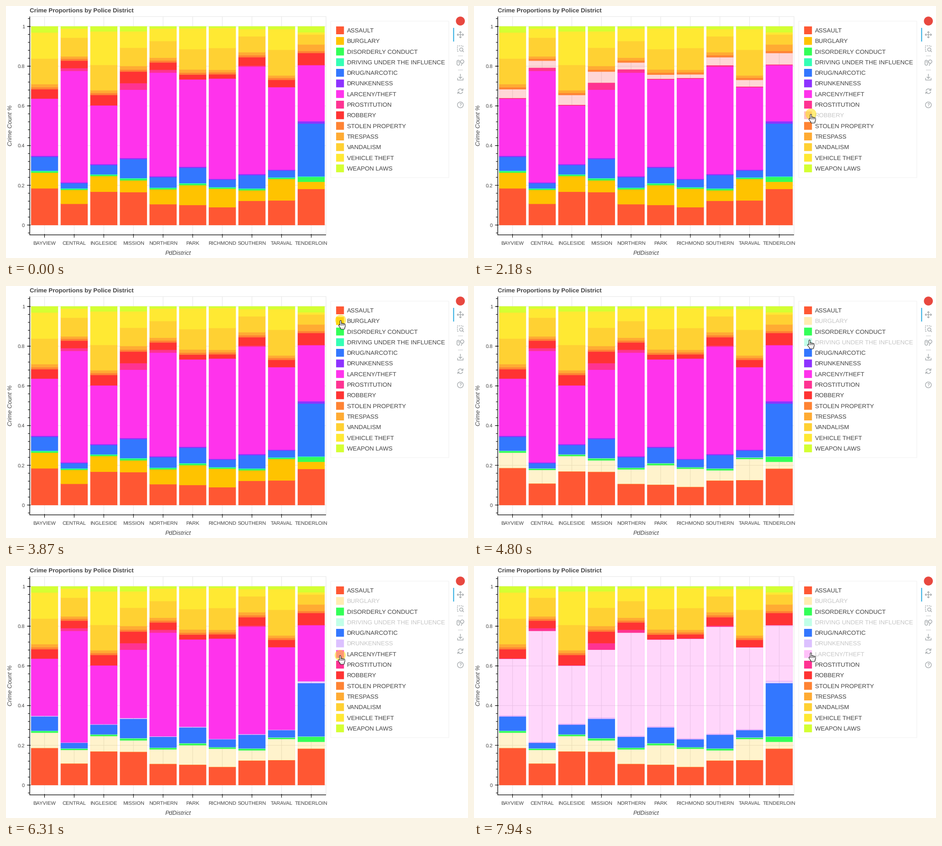
Write a matplotlib script that moves like this. It is 1012 px wide and 553 px high and loops after 8 s.

```python
import numpy as np
import matplotlib.pyplot as plt
from matplotlib.animation import FuncAnimation
from matplotlib.collections import LineCollection, PolyCollection
from matplotlib.patches import Circle, Polygon, Rectangle
from matplotlib.transforms import Affine2D

W, H, DPI = 1012, 553, 64
PX = 72 / DPI                       # points per pixel
LOOP, STEP = 8000, 40
INK, GRID, ICON = "#444444", "#e5e5e5", "#a1a6a9"
BIG, SMALL = 13.2, 11.17            # font sizes in pixels

LEFT, RIGHT, TOP, BOTTOM = 52, 701, 23.2, 502.3
ZERO, UNIT = 480.6, 435.6

# Key levels in thousandths: top of assault and burglary,
# bottom and top of larceny, bottom and top of vandalism
DISTRICTS = {
    "BAYVIEW": (185, 264, 349, 636, 710, 839),
    "CENTRAL": (107, 177, 215, 777, 850, 944),
    "INGLESIDE": (168, 247, 307, 602, 679, 807),
    "MISSION": (166, 225, 338, 682, 801, 893),
    "NORTHERN": (105, 180, 246, 768, 843, 927),
    "PARK": (101, 201, 294, 733, 784, 886),
    "RICHMOND": (90, 183, 233, 737, 782, 892),
    "SOUTHERN": (122, 175, 257, 798, 871, 951),
    "TARAVAL": (124, 232, 279, 694, 754, 883),
    "TENDERLOIN": (182, 218, 523, 805, 910, 960),
}
CRIMES = {
    "ASSAULT": "#ff5733", "BURGLARY": "#ffc300",
    "DISORDERLY CONDUCT": "#33ff57",
    "DRIVING UNDER THE INFLUENCE": "#33ffb5",
    "DRUG/NARCOTIC": "#3377ff", "DRUNKENNESS": "#8d33ff",
    "LARCENY/THEFT": "#ff33ec", "PROSTITUTION": "#ff3392",
    "ROBBERY": "#ff3333", "STOLEN PROPERTY": "#ff8333",
    "TRESPASS": "#ffab33", "VANDALISM": "#ffd133",
    "VEHICLE THEFT": "#ffe933", "WEAPON LAWS": "#d4ff33",
}

# Pointer moves: start, end, number of steps, way points
MOVES = [
    (60, 240, 3, [(1044, 640), (846, 325)]),
    (570, 930, 5, [(846, 325), (739, 237)]),
    (1090, 1360, 4, [(739, 237), (741, 238), (738, 237)]),
    (2770, 3520, 10, [(738, 237), (748, 170), (736, 95), (724, 57), (733, 75)]),
    (4120, 4440, 5, [(733, 75), (731, 97), (735, 118)]),
    (4950, 5370, 6, [(735, 118), (735, 174)]),
    (5790, 6140, 5, [(735, 174), (732, 196)]),
    (7280, 7440, 3, [(732, 196), (736, 215)]),
    (7620, 7940, 5, [(736, 215), (738, 190)]),
]
# Press, release, legend entry toggled on release
CLICKS = [(1450, 1530, 8), (2180, 2260, 8), (3870, 3960, 1),
          (4610, 4800, 3), (5450, 5610, 5), (6310, 6470, 6)]

plt.rcParams.update({"font.family": "Liberation Sans", "text.hinting": "none"})
fig = plt.figure(figsize=(W / DPI, H / DPI), dpi=DPI, facecolor="white")
ax = fig.add_axes([0, 0, 1, 1])
ax.set(xlim=(0, W), ylim=(H, 0))
ax.axis("off")


def lines(segments, color, width=1, z=1, **kw):
    art = LineCollection(segments, colors=color, linewidths=width * PX,
                         zorder=z, snap=False, **kw)
    ax.add_collection(art, autolim=False)
    return art


def label(x, mid, text, size=SMALL, ha="left", color=INK, **kw):
    """Text whose capitals are centred on the height mid."""
    return ax.text(x, mid + .358 * size, text, fontsize=size * PX, ha=ha,
                   va="baseline", color=color, zorder=6, **kw)


def box(x, y, w, h, **kw):
    return ax.add_patch(Rectangle((x, y), w, h, snap=False, **kw))


def arc(x, y, r, start=0, end=360):
    a = np.radians(np.linspace(start, end, 30))
    return np.column_stack([x + r * np.cos(a), y + r * np.sin(a)])


def stack_levels(assault, burglary, larceny, larceny_top, vandal, vandal_top):
    """Borders of all stacked parts; the thin ones follow from the key levels."""
    trespass = 8.7 + .08 * (larceny - burglary)
    disorderly = burglary + 1.8 + .02 * trespass ** 2
    robbery_top = vandal - trespass - 10
    robbery = max(larceny_top + 2, robbery_top - .35 * assault)
    weapon = 1000 - .00087 * assault ** 2
    return [0, assault, burglary, disorderly, disorderly + 3.5,
            larceny - .35 * trespass, larceny, larceny_top, robbery, robbery_top,
            vandal - trespass, vandal, vandal_top, weapon, 1000]


def draw_axes():
    majors = ZERO - UNIT * np.arange(6) / 5
    minors = ZERO - UNIT * np.arange(-1, 27) / 25
    pitch = (RIGHT - LEFT) / len(DISTRICTS)
    centres = LEFT + pitch * (np.arange(len(DISTRICTS)) + .5)

    lines([[(LEFT, y), (RIGHT, y)] for y in majors]
          + [[(x, TOP), (x, BOTTOM)] for x in centres]
          + [[(LEFT, TOP), (RIGHT, TOP), (RIGHT, BOTTOM)]], GRID)
    lines([[(LEFT, TOP), (LEFT, BOTTOM), (RIGHT, BOTTOM)]], "black", 1.3, 4)
    lines([[(LEFT - 6, y), (LEFT + 2, y)] for y in majors]
          + [[(LEFT - 4, y), (LEFT, y)] for y in minors]
          + [[(x, BOTTOM - 2), (x, BOTTOM + 6)] for x in centres], "black", 1.1, 4)

    for i, y in enumerate(majors):
        label(41, y, f"{i / 5:g}", ha="right")
    for x, name in zip(centres, DISTRICTS):
        label(x, 520, name, ha="center")
    label(52, 10, "Crime Proportions by Police District", BIG, weight="bold")
    label(376.7, 541.5, "PdDistrict", BIG, "center", style="italic")
    ax.text(9.8, 262, "Crime Count %", fontsize=BIG * PX, rotation=90,
            ha="center", va="center", color=INK, style="italic")
    return centres, .45 * pitch


def draw_bars(centres, half):
    levels = np.array([stack_levels(*key) for key in DISTRICTS.values()])
    edges = ZERO - UNIT * levels / 1000
    layers = []
    for k, color in enumerate(CRIMES.values()):
        rects = [[(x - half, lo), (x + half, lo), (x + half, hi), (x - half, hi)]
                 for x, lo, hi in zip(centres, edges[:, k], edges[:, k + 1])]
        layer = PolyCollection(rects, facecolors=color, edgecolors=color,
                               linewidths=PX, zorder=2, snap=False)
        ax.add_collection(layer, autolim=False)
        layers.append(layer)
    return layers


def draw_legend():
    box(711.4, 33.3, 258.6, 343.3, fc="white", ec="#f1f1f1", lw=PX, zorder=4)
    items = []
    for k, (name, color) in enumerate(CRIMES.items()):
        mid = 53.4 + 23.3 * k
        swatch = box(723.1, mid - 8.6, 17.2, 17.2, fc=color, lw=0, zorder=5)
        items.append((swatch, label(746.7, mid - .3, name, BIG)))
    return items


def draw_toolbar():
    x = 995.3
    ax.add_patch(Circle((x, 33), 9.8, fc="#e8483f", lw=0))
    lines([[(980.5, 48), (980.5, 78)]], "#26aae1", 2)
    lines([[(990, y), (1001, y)] for y in (109.5, 140.5)], "#c8cacc")

    strokes = [[(x - 6, 63), (x + 6, 63)], [(x, 57), (x, 69)]]
    for ux, uy in ((1, 0), (-1, 0), (0, 1), (0, -1)):       # pan
        tip = np.array([x + 7 * ux, 63 + 7 * uy])
        back, side = 2.5 * np.array([ux, uy]), 2.5 * np.array([uy, ux])
        strokes.append([tip - back + side, tip, tip - back - side])
    # box zoom
    strokes += [arc(x + 2, 95.5, 3.6), [(x + 4.6, 98), (x + 7.5, 101)]]
    lines([[(x + 5.5, 90), (x + 5.5, 87.5), (x - 6.5, 87.5), (x - 6.5, 99.5),
            (x - 2.5, 99.5)]], ICON, 1.35, linestyles=[(0, (2, 1.2))])
    # wheel zoom
    strokes += [np.vstack([arc(x - 4.5, 122, 3, 180, 360),
                           arc(x - 4.5, 127, 3, 0, 180), [(x - 7.5, 122)]]),
                [(x - 4.5, 121), (x - 4.5, 124)],
                arc(x + 4, 122, 3.7), [(x + 4.5, 125.5), (x + 1.5, 131)]]
    # save
    strokes += [[(x, 149), (x, 159)], [(x - 3.5, 155.5), (x, 159), (x + 3.5, 155.5)],
                [(x - 6, 158), (x - 6, 162.5), (x + 6, 162.5), (x + 6, 158)]]
    for s in (1, -1):                                       # reset
        strokes += [arc(x, 187, 5.2 * s, 10, 155),
                    [(x + 5.8 * s, 187 - 6 * s), (x + 5.5 * s, 187 - 1.8 * s),
                     (x + 1.6 * s, 187 - 1.8 * s)]]
    strokes.append(arc(x, 217, 6.4))                        # help
    lines(strokes, ICON, 1.35)
    label(x, 217, "?", 9.5, "center", ICON, weight="bold")


def draw_pointer():
    shift = Affine2D()
    place = shift + ax.transData
    glow = ax.add_patch(Circle((0, 0), 12, fc="#ffe11c", alpha=.58, lw=0,
                               zorder=10, transform=place))
    # The hand is a bundle of round strokes: black first, thinner white on top
    fingers = [[(2.9 * k, 2 + 5 * (k > 0) + .8 * k), (2.9 * k, 13)] for k in range(4)]
    palm = [[(.4 * k, 13 + 1.8 * k), (8.7 - .4 * k, 13 + 1.8 * k)] for k in range(4)]
    thumb = [[(-3, 11.3), (.5, 16)]]
    hand = [lines(fingers + palm + thumb, color, width, 11 + z, transform=place,
                  capstyle="round")
            for z, (color, width) in enumerate((("black", 3.9), ("white", 2)))]
    arrow = ax.add_patch(Polygon(
        [(0, 0), (0, 16), (3.7, 12.6), (6.3, 18.6), (8.8, 17.5), (6.3, 11.7),
         (11.5, 11.5)], fc="white", ec="black", lw=1.1 * PX, zorder=11,
        transform=place))
    return shift, glow, hand, arrow


def pointer_at(t):
    pos = MOVES[0][3][0]
    for start, end, steps, way in MOVES:
        if t < start:
            break
        done = min(steps, 1 + int((t - start) * (steps - 1) / (end - start)))
        u = done / steps * (len(way) - 1)
        pos = [np.interp(u, range(len(way)), axis) for axis in zip(*way)]
    return pos


bars = draw_bars(*draw_axes())
legend = draw_legend()
draw_toolbar()
shift, glow, hand, arrow = draw_pointer()


def update(frame):
    t = frame * STEP + 30
    released = [k for _, up, k in CLICKS if t >= up]
    for k, (bar, item) in enumerate(zip(bars, legend)):
        muted = released.count(k) % 2 == 1
        bar.set_alpha(.2 if muted else 1)
        for part in item:
            part.set_alpha(.3 if muted else 1)

    x, y = pointer_at(t)
    shift.clear().translate(x, y)
    over = 711 < x < 970 and 33 < y < 376
    for part in hand:
        part.set_visible(over)
    arrow.set_visible(not over)
    glow.set_visible(any(down <= t < up for down, up, _ in CLICKS))


anim = FuncAnimation(fig, update, frames=LOOP // STEP, interval=STEP,
                     repeat=True, blit=False)
plt.show()
```
